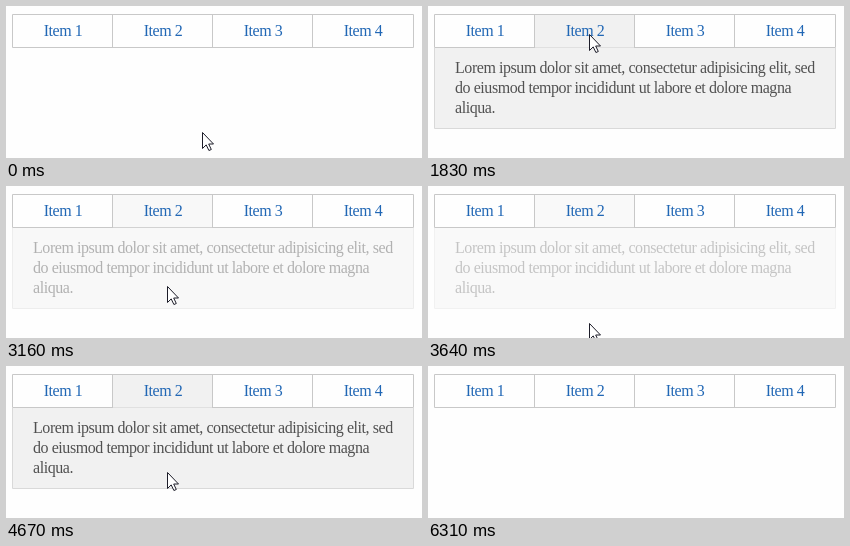
Write an HTML page that moves like this. It is 416x152 px and loops after 6.77 s.

```html
<!DOCTYPE html>
<html lang="en">
<head>
<meta charset="utf-8">
<title>Tabs with a fading panel</title>
<style>
  html, body { margin: 0; width: 100%; height: 100%; overflow: hidden; background: #fefefe; }
  svg { display: block; width: 416px; height: 152px; }
  text { font: 16px "Liberation Serif", Times, serif; letter-spacing: -.44px; }
  .link { fill: #2167b5; text-anchor: middle; }
  .line { fill: none; stroke: #c8c8c8; }
</style>
</head>
<body>
<svg viewBox="0 0 416 152">
  <path class="line" d="M6.5 8.5h401v33h-401zM106.5 8.5v33M206.5 8.5v33M306.5 8.5v33"/>
  <g id="panel">
    <path fill="#ececec" d="M107 9h99v33h201v80h-400v-80h100z"/>
    <path class="line" d="M6.5 42v80.5h401v-80.5"/>
    <text x="27" y="67">Lorem ipsum dolor sit amet, consectetur adipisicing elit, sed</text>
    <text x="27" y="87">do eiusmod tempor incididunt ut labore et dolore magna</text>
    <text x="27" y="107">aliqua.</text>
  </g>
  <text class="link" x="57" y="30">Item 1</text>
  <text class="link" x="157" y="30">Item 2</text>
  <text class="link" x="257" y="30">Item 3</text>
  <text class="link" x="357" y="30">Item 4</text>
  <path id="cursor" fill="#fff" stroke="#1c1c28" d="M.5 .5v16l3.7-3.6 2.7 5.6 2.4-1-2.6-5.5h4.8z"/>
</svg>
<script>
const LOOP = 6770, START = 750, END = 6310, STEP = 118.3;
const panel = document.getElementById('panel');
const cursor = document.getElementById('cursor');

const mix = (a, b, p) => a + (b - a) * p;
const ramp = (t, from, to) => Math.min(1, Math.max(0, (t - from) / (to - from)));

// The pointer swings across the panel's lower edge
const swing = t => 2 * Math.PI * (t - 2510) / 695;

function pointer(t) {
  const x = 196 - 35 * ramp(t, 750, 1220) + 45 * ramp(t, 5900, 6200);
  const tab = mix(126, 28, ramp(t, 750, 1520));
  const inPanel = mix(tab, 120 - 22 * Math.cos(swing(t)), ramp(t, 2290, 2540));
  return [x, mix(inPanel, 140, ramp(t, 5500, 5950))].map(Math.round);
}

// Each swing out dims the panel, each swing back brightens it
function opacity(t) {
  const pulse = .43 + .32 * Math.sin(swing(t));
  return ramp(t, 1380, 2080) * mix(1, pulse, ramp(t, 2620, 3000)) * (1 - ramp(t, 5700, 6250));
}

// Motion advances in visible steps, each posed near its middle
function snap(t) {
  if (t < START) return 0;
  return START + STEP * (Math.floor((t - START + 15) / STEP) + .35);
}

function draw(now) {
  const time = now % LOOP, t = snap(time);
  panel.setAttribute('opacity', opacity(t));
  cursor.setAttribute('transform', `translate(${pointer(t)})`);
  cursor.setAttribute('visibility', time < END ? 'visible' : 'hidden');
  requestAnimationFrame(draw);
}
draw(performance.now());
</script>
</body>
</html>
```
